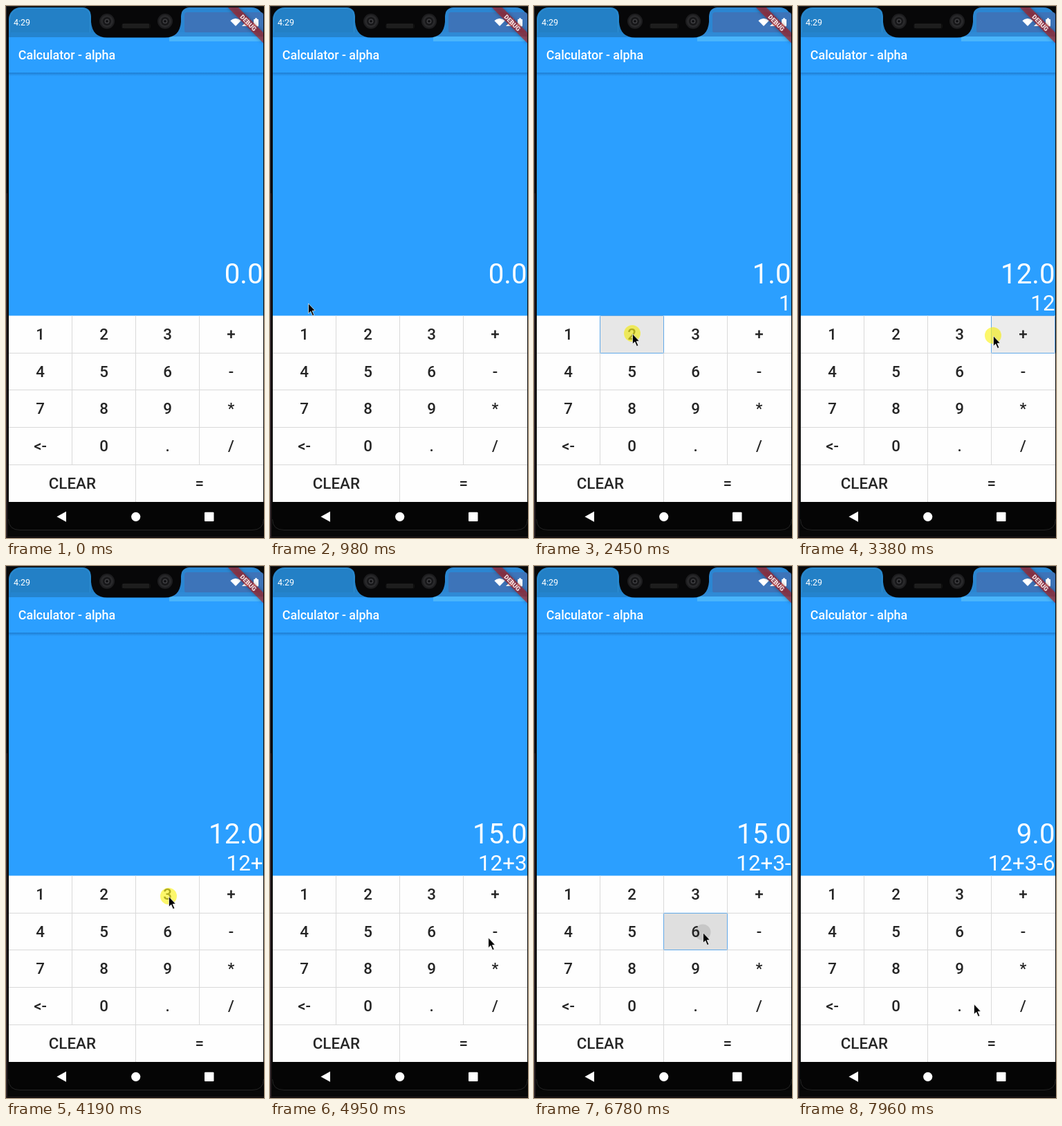
An HTML page with a canvas for the animation above (7990 ms loop, 373 by 767 pixels).

```html
<!DOCTYPE html>
<html lang="en">
<head>
<meta charset="utf-8">
<title>Calculator</title>
<style>
html, body { margin: 0; width: 100%; height: 100%; overflow: hidden; background: #080808; }
canvas { display: block; width: 373px; height: 767px; }
</style>
</head>
<body>
<canvas id="stage" width="373" height="767"></canvas>
<script>
const ctx = document.getElementById('stage').getContext('2d');
const LOOP = 7990;
const BLUE = '#2b9fff';
const FONT = 'Roboto, sans-serif';
const SP = 0.8944; // stage pixels per device unit
const COLS = [4, 95.5, 187.5, 279.5, 371.5];
const ROWS = [446.5, 500.3, 553.8, 607.4, 661, 715];
const KEYS = ['123+', '456-', '789*'].map(r => [...r]).concat([['<-', '0', '.', '/']]);

// Key presses: time, column, row, expression and result afterwards
const PRESSES = [
  [1410, 0, 0, '1', '1.0'],
  [2270, 1, 0, '12', '12.0'],
  [3210, 3, 0, '12+', '12.0'],
  [4190, 2, 0, '12+3', '15.0'],
  [5600, 3, 1, '12+3-', '15.0'],
  [6530, 2, 1, '12+3-6', '9.0']
];
const YELLOW_END = 215, INK_START = 130, RELEASE = 290, INK_END = 430;

// Pointer path: time, x, y
const PATH = [
  [500, 180, 737], [900, 60, 424], [980, 55, 428], [1260, 58, 472],
  [1840, 58, 472], [2080, 142, 472], [2710, 142, 472], [3060, 282, 475],
  [3860, 282, 475], [3980, 235, 476], [4770, 235, 476], [4950, 315, 535],
  [5110, 345, 553], [5400, 329, 530], [6020, 329, 530], [6330, 244, 528],
  [7490, 244, 528], [7720, 285, 578], [7960, 254, 631]
];

const clamp = v => Math.max(0, Math.min(1, v));

function slope(i, axis) {
  if (i <= 0 || i >= PATH.length - 1) return 0;
  const rate = k => (PATH[k + 1][axis] - PATH[k][axis]) / (PATH[k + 1][0] - PATH[k][0]);
  const a = rate(i - 1), b = rate(i);
  return a * b > 0 ? 2 * a * b / (a + b) : 0;
}

function pointerAt(t) {
  const last = PATH.length - 1;
  if (t >= PATH[last][0]) return PATH[last].slice(1);
  const i = PATH.findIndex((p, k) => k < last && t < PATH[k + 1][0]);
  const span = PATH[i + 1][0] - PATH[i][0];
  const u = (t - PATH[i][0]) / span, v = 1 - u;
  return [1, 2].map(axis =>
    PATH[i][axis] * (1 + 2 * u) * v * v + slope(i, axis) * span * u * v * v +
    PATH[i + 1][axis] * u * u * (3 - 2 * u) - slope(i + 1, axis) * span * u * u * v);
}

function rect(x, y, w, h, fill) {
  ctx.fillStyle = fill;
  ctx.fillRect(x, y, w, h);
}

function round(x, y, w, h, r, fill, stroke) {
  ctx.beginPath();
  ctx.roundRect(x, y, w, h, r);
  if (fill) { ctx.fillStyle = fill; ctx.fill(); }
  if (stroke) { ctx.strokeStyle = stroke; ctx.lineWidth = 1; ctx.stroke(); }
}

function disc(x, y, r, fill) {
  ctx.beginPath();
  ctx.arc(x, y, r, 0, Math.PI * 2);
  ctx.fillStyle = fill;
  ctx.fill();
}

function poly(points, fill) {
  ctx.beginPath();
  points.forEach(([x, y]) => ctx.lineTo(x, y));
  ctx.closePath();
  ctx.fillStyle = fill;
  ctx.fill();
}

function text(str, x, y, size, weight, fill, align = 'left') {
  ctx.font = `${weight} ${size}px ${FONT}`;
  ctx.textAlign = align;
  ctx.fillStyle = fill;
  ctx.fillText(str, x, y);
}

function statusBar() {
  round(4, 2, 119, 45, [17, 12, 0, 0], '#2380c6');
  round(253, 2, 119, 45, [12, 17, 0, 0], '#2b86d2');
  round(5.5, 3.5, 116, 60, [16, 11, 0, 0], null, '#2e8fd2');
  round(258, 9, 114, 30, 4, '#3d74b9');
  // Screen showing past the rounded notch corners
  rect(4, 38, 150, 8, '#2484ce');
  rect(222, 38, 150, 8, '#2f8ad6');
  rect(123, 20, 20, 18, '#2380c6');
  rect(233, 20, 20, 18, '#2b86d2');
}

function statusIcons() {
  text('4:29', 11, 28, 12.5, 400, '#fff');
  ctx.beginPath();
  ctx.moveTo(332, 29);
  ctx.arc(332, 28.5, 10.5, -Math.PI * 0.76, -Math.PI * 0.24);
  ctx.closePath();
  ctx.fillStyle = '#fff';
  ctx.fill();
  poly([[341, 29], [352, 29], [352, 18]], '#fff');
  poly([[346, 27], [350, 27], [350, 23]], '#8a6f9a');
  round(358, 19, 7, 10.5, 1, '#fff');
  rect(360, 17.5, 3, 2, '#fff');
}

function banner() {
  ctx.save();
  ctx.beginPath();
  ctx.roundRect(4, 2, 368, 60, [0, 16, 0, 0]);
  ctx.clip();
  ctx.translate(350.4, 24.2);
  ctx.rotate(Math.PI / 4);
  ctx.shadowColor = 'rgba(0,0,0,.5)';
  ctx.shadowBlur = 5;
  rect(-36, -5.4, 72, 10.8, 'rgba(183,28,28,.62)');
  ctx.shadowBlur = 0;
  statusLabel();
  ctx.restore();
}

function statusLabel() {
  text('DEBUG', 0, 3.3, 9.1, 900, '#f6e4e6', 'center');
}

function camera(x, y) {
  disc(x, y, 11, '#1d1d1f');
  disc(x, y, 9, '#29292b');
  disc(x, y, 6, '#161618');
  disc(x, y, 3.5, '#3b3b3e');
  disc(x, y, 1.8, '#0c0c0e');
}

function notch() {
  ctx.beginPath();
  ctx.moveTo(115, 0);
  ctx.quadraticCurveTo(123, 4, 123, 15);
  ctx.lineTo(123, 23);
  ctx.quadraticCurveTo(125, 45.5, 146, 45.5);
  ctx.lineTo(230, 45.5);
  ctx.quadraticCurveTo(251, 45.5, 253, 23);
  ctx.lineTo(253, 15);
  ctx.quadraticCurveTo(253, 4, 261, 0);
  ctx.closePath();
  ctx.fillStyle = '#070708';
  ctx.fill();
  camera(146, 22);
  camera(230, 22);
  round(167, 25, 42, 8, 4, '#121212');
  for (let i = 0; i < 19; i++) {
    for (let j = 0; j < 3; j++) rect(169 + i * 2, 26 + j * 2, 1, 1, '#404040');
  }
}

function frame() {
  rect(0, 0, 373, 767, '#080808');
  rect(0, 0, 1, 767, '#302c2f');
  rect(1, 270, 1, 497, '#2c1d20');
  rect(0, 0, 373, 1, '#252525');
}

function navBar() {
  rect(4, 715, 368, 41, '#050505');
  poly([[73.4, 736.3], [87, 728.8], [87, 743.8]], '#fff');
  disc(187.7, 736.3, 6.6, '#fff');
  round(287, 729.8, 13.5, 13.3, 1, '#fff');
  ctx.strokeStyle = '#242424';
  ctx.lineWidth = 1;
  ctx.beginPath();
  ctx.moveTo(3.5, 740);
  ctx.quadraticCurveTo(4, 755.5, 20, 755.5);
  ctx.lineTo(356, 755.5);
  ctx.quadraticCurveTo(372, 755.5, 372.5, 740);
  ctx.stroke();
  rect(0, 765, 373, 1, '#221a1c');
}

function appBar() {
  const shade = ctx.createLinearGradient(0, 96, 0, 101);
  shade.addColorStop(0, 'rgba(0,40,90,.28)');
  shade.addColorStop(1, 'rgba(0,40,90,0)');
  rect(4, 96, 368, 5, shade);
  rect(4, 45, 368, 51, BLUE);
  rect(236, 44, 136, 7, '#4ab5fb');
  text('Calculator - alpha', 17.8, 77, 20 * SP, 500, '#fff');
}

function keyBox([, col, row]) {
  return [COLS[col], ROWS[row], COLS[col + 1] - COLS[col], ROWS[row + 1] - ROWS[row]];
}

function ink(press, age, x, y) {
  const box = keyBox(press);
  const fade = 1 - clamp((age - RELEASE) / (INK_END - RELEASE));
  const level = clamp((age - INK_START) / 70) * fade;
  ctx.save();
  ctx.beginPath();
  ctx.rect(...box);
  ctx.clip();
  rect(...box, `rgba(0,0,0,${0.122 * level})`);
  const radius = clamp((age - 100) / 70) * 11.5 + clamp((age - 260) / 130) * 75;
  disc(x, y, radius, `rgba(0,0,0,${0.11 * level})`);
  ctx.restore();
}

function keypad(press, age, x, y) {
  rect(4, ROWS[0], 368, ROWS[5] - ROWS[0], '#fefefe');
  const inked = press && age > 100;
  if (inked) ink(press, age, x, y);
  for (const line of ROWS.slice(1, 5)) rect(4, Math.floor(line), 368, 1, '#d9d9d9');
  for (const i of [1, 2, 3]) {
    const bottom = i === 2 ? ROWS[5] : ROWS[4];
    rect(Math.floor(COLS[i]), ROWS[0], 1, bottom - ROWS[0], '#d9d9d9');
  }
  if (inked) {
    const [bx, by, w, h] = keyBox(press);
    ctx.globalAlpha = 1 - clamp((age - RELEASE) / (INK_END - RELEASE));
    round(Math.floor(bx) + 0.5, Math.floor(by) + 0.5, Math.round(w), Math.round(h), 1, null, '#62a9e8');
    ctx.globalAlpha = 1;
  }
  const label = (str, cx, row) => {
    const base = Math.floor((ROWS[row] + ROWS[row + 1]) / 2 + 8.1);
    text(str, cx, base, 25 * SP, 500, '#252525', 'center');
  };
  KEYS.forEach((keys, row) => keys.forEach((k, col) => label(k, 49.5 + col * 92, row)));
  label('CLEAR', 95.8, 4);
  label('=', 279.8, 4);
}

function pointer(x, y) {
  ctx.save();
  ctx.translate(x + 0.5, y + 0.8);
  ctx.lineJoin = 'round';
  poly([[0, 0], [0, 14.5], [3.3, 11.4], [6, 17.7], [8.3, 16.7], [5.6, 10.6], [9.7, 10.2]], '#000');
  ctx.strokeStyle = 'rgba(255,255,255,.85)';
  ctx.lineWidth = 0.8;
  ctx.stroke();
  ctx.restore();
}

function draw(t) {
  const done = PRESSES.filter(p => t >= p[0] + RELEASE).pop();
  const [expr, result] = done ? done.slice(3) : ['', '0.0'];
  const press = PRESSES.find(p => t >= p[0] && t < p[0] + INK_END);
  const age = press ? t - press[0] : 0;
  const [x, y] = t >= 500 ? pointerAt(t) : [0, 0];

  frame();
  statusBar();
  rect(4, 45, 368, 402, BLUE);
  appBar();
  statusIcons();
  banner();
  notch();
  text(result, 371.5, 400, 45 * SP, 400, '#fff', 'right');
  text(expr, 371.5, 439, 35 * SP, 400, '#fff', 'right');
  keypad(press, age, x, y);
  navBar();
  if (press && age < YELLOW_END) disc(x, y, 12, 'rgba(250,242,28,.65)');
  if (t >= 500) pointer(x, y);
}

const start = performance.now();
function tick() {
  draw((performance.now() - start) % LOOP);
  requestAnimationFrame(tick);
}
tick();
</script>
</body>
</html>
```
